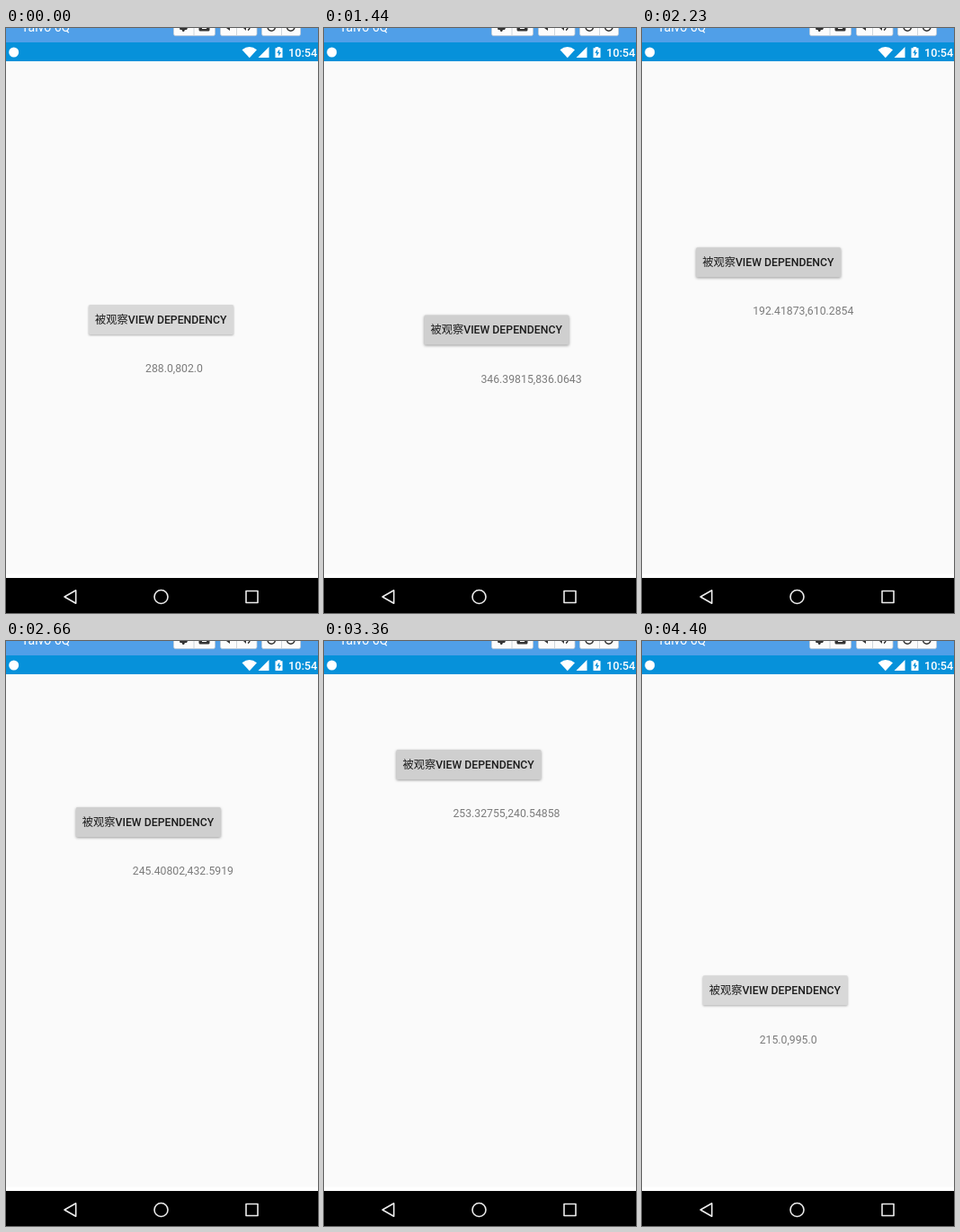
An HTML page for the animation above (5.64 s loop, 347 by 651 pixels).

```html
<!DOCTYPE html>
<html lang="zh">
<head>
<meta charset="utf-8">
<title>View dependency</title>
<style>
  html, body { margin: 0; width: 100%; height: 100%; overflow: hidden; background: #fafafa; }
  svg { display: block; width: 347px; height: 651px; }
  text { font-family: Roboto, "Noto Sans CJK SC", "Noto Sans CJK", sans-serif; font-size: 12.25px; }
  .caption { font-weight: 500; fill: #1c1c1c; }
  .caption tspan { font-family: "Noto Sans CJK SC", "Noto Sans CJK", sans-serif; font-weight: 400; }
  #face { fill: #d8d8d8; filter: drop-shadow(0 1px .8px rgba(0, 0, 0, .3)); }
  #face.raised { filter: drop-shadow(0 1.6px 1.8px rgba(0, 0, 0, .38)); }
  .nav { fill: none; stroke: #ececec; stroke-width: 1.6; stroke-linejoin: round; }
</style>
</head>
<body>
<svg viewBox="0 0 347 651">
  <rect width="347" height="651" fill="#fafafa"/>

  <!-- Emulator toolbar -->
  <rect width="347" height="16" fill="#509fe8"/>
  <text x="17" y="3.5" fill="#fff" style="font-size:14px">Talvo 6Q</text>
  <g fill="#fcfcfc" stroke="#c5ccd3" stroke-width=".8">
    <rect x="186.5" y="-10" width="46" height="18.6" rx="2"/>
    <rect x="238.5" y="-10" width="40.500" height="18.6" rx="2"/>
    <rect x="284.5" y="-10" width="43" height="18.6" rx="2"/>
    <path d="M209 0V8.500M256.500 0V8.500M306.500 0V8.500"/>
  </g>
  <g fill="#333">
    <path d="M193 0h9l-1 2-2 0-1 2h-1.500l-1-2-2 0z"/>
    <rect x="214.500" y="-6" width="12" height="9.500" rx="1.500"/>
    <path d="M245 0h4v3z"/>
    <path d="M264 0h3v3z"/>
  </g>
  <rect x="218" y="-1" width="5" height="2" fill="#fff"/>
  <g fill="none" stroke="#333" stroke-width="1.500">
    <path d="M269 2.500q2-1 2-3M291 -1a4.200 4.200 0 0 0 8.400 0M312.500 -1a4.200 4.200 0 0 0 8.400 0"/>
  </g>

  <!-- Status bar -->
  <rect y="16" width="347" height="21" fill="#0691da"/>
  <circle cx="8.700" cy="27" r="5.500" fill="#fff"/>
  <g fill="#fff">
    <path d="M262.500 24.200Q270.800 17.800 279 24.200L270.800 33.200z"/>
    <path d="M292.500 21V33H280.500z"/>
    <path d="M299.500 22.300h2.200V21h3.600v1.300h2.200V33h-8z"/>
    <text x="314" y="31.500" style="font-size:12.7px;font-weight:500">10:54</text>
  </g>
  <path d="M304.200 23.500l-3 4.200h1.900v3.800l3-4.500h-1.900z" fill="#0691da"/>

  <g id="view">
    <rect id="face" width="161" height="33" rx="1.500"/>
    <text class="caption" x="7" y="20.700"><tspan>被观察</tspan>VIEW DEPENDENCY</text>
    <text id="label" x="63" y="75.300" fill="#7c7c7c"></text>
  </g>

  <!-- Navigation bar -->
  <rect y="607.500" width="347" height="4.500" fill="#fff"/>
  <rect y="612" width="347" height="39" fill="#000"/>
  <g class="nav">
    <path d="M65 633L77.700 625.800V640.200z"/>
    <circle cx="172.500" cy="633" r="7.500"/>
    <rect x="267" y="626.500" width="13" height="13"/>
  </g>
</svg>
<script>
const LOOP = 5640, START = 1080, LAST = 34;
const REST = "288.0,802.0";

// Drag path: step number and the reported "x,y".
const path = [
  [0, "446.0,862.9377"],
  [6, "300.21436,820.4417"],
  [8, "273.32196,793.161"],
  [13, "192.41873,610.2854"],
  [14, "190.16302,580.7316"],
  [18, "245.40802,432.5919"],
  [20, "246.13257,427.3182"],
  [24, "348.27136,292.4175"],
  [26, "253.32755,240.54858"],
  [27, "180.51924,322.6413"],
  [29, "162.28415,514.3726"],
  [30, "186.42078,635.8910"],
  [33, "214.16238,988.4271"],
  [34, "215.0,995.0"]
].map(([step, text]) => ({ step, text, pos: text.split(",").map(Number) }));

// Steps last 90 ms, some 80 ms.
const shortSteps = new Set([5, 10, 15, 17, 19, 23, 27, 28, 34]);
const times = [START];
for (let i = 0; i <= LAST; i++) times.push(times[i] + (shortSteps.has(i) ? 80 : 90));

function slope(i, axis) {
  const a = path[Math.max(i - 1, 0)], b = path[Math.min(i + 1, path.length - 1)];
  return (b.pos[axis] - a.pos[axis]) / (b.step - a.step);
}

function reading(step) {
  const known = path.find(k => k.step === step);
  if (known) return known.text;
  const i = path.findIndex(k => k.step > step) - 1;
  const a = path[i], b = path[i + 1], h = b.step - a.step, u = (step - a.step) / h;
  const at = axis =>
    a.pos[axis] * (1 + 2 * u) * (1 - u) ** 2 + b.pos[axis] * u * u * (3 - 2 * u) +
    h * (slope(i, axis) * u * (1 - u) ** 2 - slope(i + 1, axis) * u * u * (1 - u));
  return at(0).toFixed(5) + "," + at(1).toFixed(4);
}

const readings = Array.from({ length: LAST + 1 }, (_, step) => reading(step));
const [view, face, label] = ["view", "face", "label"].map(id => document.getElementById(id));
let shown;

function show(step) {
  const text = step < 0 ? REST : readings[Math.min(step, LAST)];
  const [x, y] = text.split(",").map(Number);
  const press = step < LAST ? Math.min(Math.max(step, 0) / 2, 1) : 0;
  const grey = 216 - 9 * press;
  view.setAttribute("transform", `translate(${x / 3 - 4} ${y / 3 + 40.7})`);
  label.textContent = text;
  face.style.fill = `rgb(${grey}, ${grey}, ${grey})`;
  face.classList.toggle("raised", step > 0 && step <= LAST);
}

function frame() {
  const t = performance.now() % LOOP;
  const step = times.filter(time => time <= t).length - 1;
  if (step !== shown) show(shown = step);
  requestAnimationFrame(frame);
}
frame();
</script>
</body>
</html>
```
